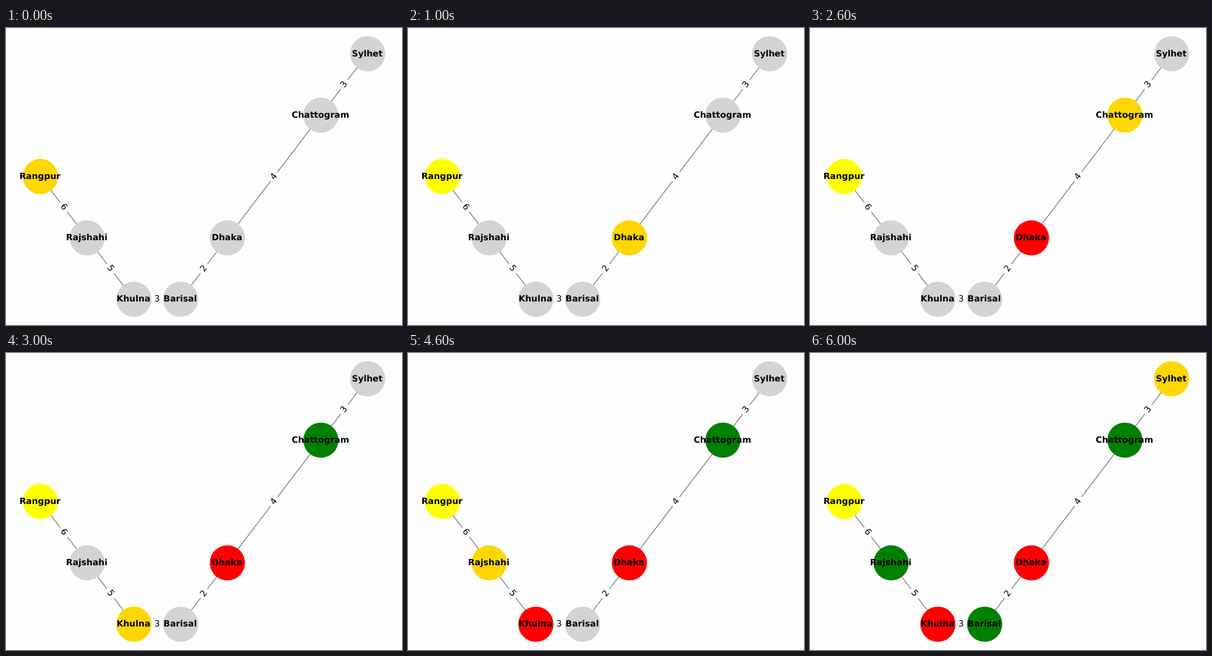
An HTML page that plays this animation: 640x480 px, repeating every 7000 ms.

```html
<!DOCTYPE html>
<html lang="en">
<head>
<meta charset="utf-8">
<title>Graph colouring</title>
<style>
  html, body { margin: 0; width: 100%; height: 100%; overflow: hidden; background: #fefefe; }
  svg { display: block; width: 640px; height: 480px; }
  text { font: 13.89px "DejaVu Sans", sans-serif; text-anchor: middle; text-rendering: geometricPrecision; }
  .name { font-weight: bold; }
</style>
</head>
<body>
<svg id="stage" viewBox="0 0 640 480"></svg>
<script>
const STEP = 1000;
const BLANK = "#d3d3d3", CURRENT = "#ffd700";
const PAPER = "#fefefe";

// name, grid column, grid row, final colour; listed in visiting order
const nodes = [
  ["Rangpur", 0, 2, "#ffff00"],
  ["Dhaka", 4, 3, "#ff0000"],
  ["Chattogram", 6, 1, "#008000"],
  ["Khulna", 2, 4, "#ff0000"],
  ["Rajshahi", 1, 3, "#008000"],
  ["Barisal", 3, 4, "#008000"],
  ["Sylhet", 7, 0, "#008000"]
].map(([name, col, row, color]) => ({
  name, color, x: 55.6 + col * 75.55, y: 41.65 + row * 99.175
}));

// from, to, weight (from is always the left end)
const edges = [[0, 4, 6], [4, 3, 5], [3, 5, 3], [5, 1, 2], [1, 2, 4], [2, 6, 3]];

const stage = document.getElementById("stage");

function add(tag, attrs, parent = stage, text = "") {
  const el = document.createElementNS("http://www.w3.org/2000/svg", tag);
  for (const key in attrs) el.setAttribute(key, attrs[key]);
  el.textContent = text;
  return parent.appendChild(el);
}

for (const [from, to] of edges) {
  const a = nodes[from], b = nodes[to];
  add("line", { x1: a.x, y1: a.y, x2: b.x, y2: b.y, stroke: "#808080", "stroke-width": 1.39 });
}

for (const [from, to, weight] of edges) {
  const a = nodes[from], b = nodes[to];
  const angle = Math.atan2(b.y - a.y, b.x - a.x) * 180 / Math.PI;
  const g = add("g", {
    transform: `translate(${(a.x + b.x) / 2} ${(a.y + b.y) / 2}) rotate(${angle})`
  });
  add("rect", { x: -9.4, y: -11.7, width: 18.8, height: 23.4, rx: 4.5, fill: PAPER }, g);
  add("text", { x: -0.3, y: 3.8 }, g, weight);
}

for (const n of nodes) {
  n.disc = add("circle", { cx: n.x, cy: n.y, r: 28.45, fill: BLANK });
}
for (const n of nodes) {
  add("text", { class: "name", x: n.x - 0.7, y: Math.round(n.y + 4) }, stage, n.name);
}

function draw(time) {
  const step = Math.floor(time / STEP) % nodes.length;
  nodes.forEach((n, i) => {
    n.disc.setAttribute("fill", i < step ? n.color : i === step ? CURRENT : BLANK);
  });
}

function tick() {
  draw(performance.now());
  requestAnimationFrame(tick);
}
tick();
</script>
</body>
</html>
```
